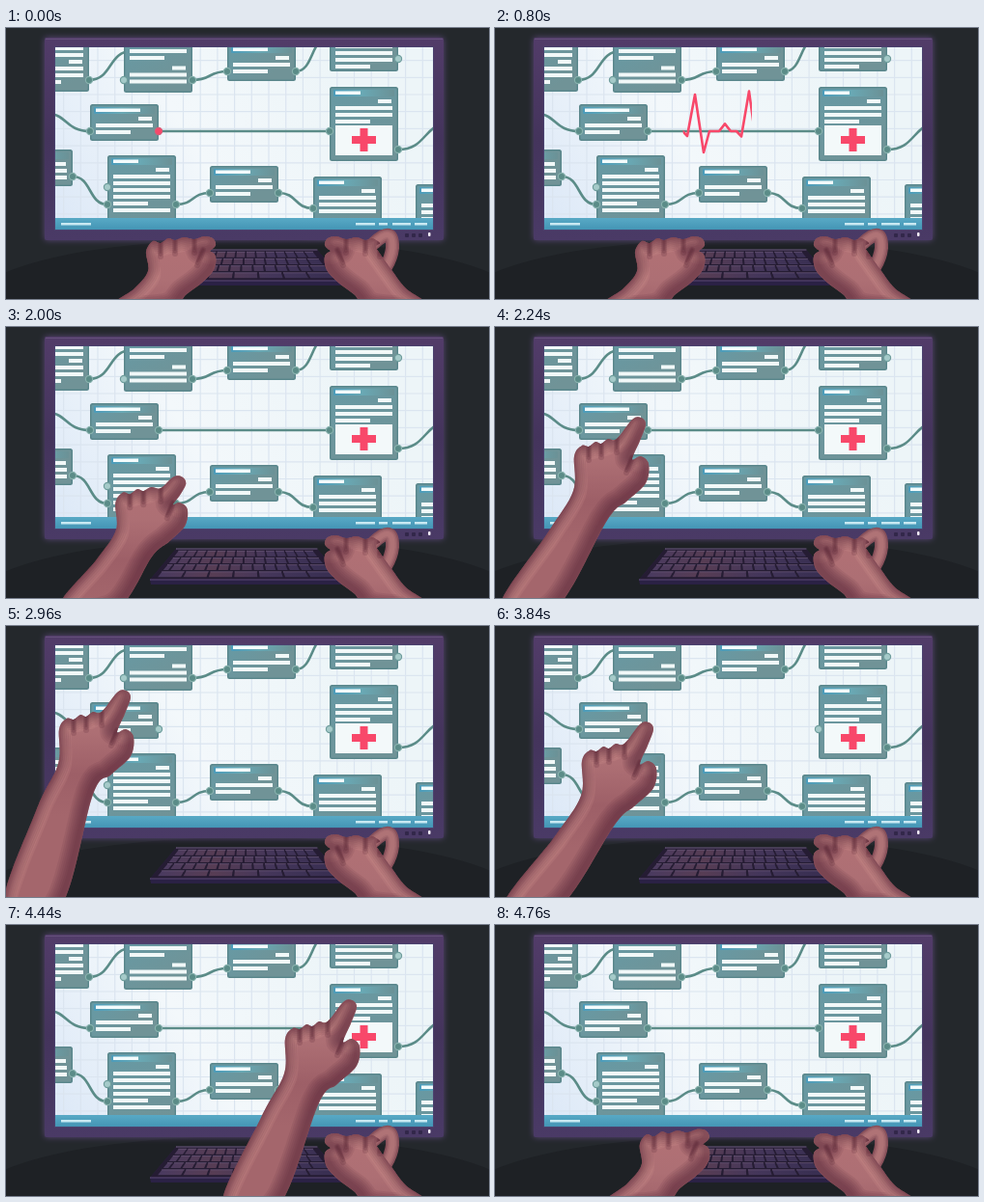
An HTML page with a canvas that plays this animation: 500 by 281 pixels, repeating every 4800 ms.

```html
<!DOCTYPE html>
<html lang="en">
<head>
<meta charset="utf-8">
<title>Wiring nodes by hand</title>
<style>
html, body { margin: 0; width: 100%; height: 100%; overflow: hidden; background: #24282c; }
canvas { display: block; width: 500px; height: 281px; }
</style>
</head>
<body>
<canvas></canvas>
<script>
const LOOP = 4800;
const canvas = document.querySelector('canvas');
const ctx = canvas.getContext('2d');
const ratio = window.devicePixelRatio || 1;
canvas.width = 500 * ratio;
canvas.height = 281 * ratio;

const PINK = '#f8486a', WIRE = '#5b8c88', FREE = '#a5cac9';
const lerp = (a, b, u) => a + (b - a) * u;
const clamp = u => Math.max(0, Math.min(1, u));
const smooth = u => u * u * (3 - 2 * u);

function box(x, y, w, h, fill, r = 0) {
  ctx.fillStyle = fill;
  ctx.beginPath();
  ctx.roundRect(x, y, w, h, r);
  ctx.fill();
}

function shade(x0, y0, x1, y1, ...colors) {
  const g = ctx.createLinearGradient(x0, y0, x1, y1);
  colors.forEach((c, i) => g.addColorStop(i / (colors.length - 1), c));
  return g;
}

function polygon(pts) {
  const path = new Path2D();
  pts.forEach(([x, y]) => path.lineTo(x, y));
  return path;
}

function area(pts, fill) {
  ctx.fillStyle = fill;
  ctx.fill(polygon(pts));
}

function stroke(path, width, color) {
  ctx.lineWidth = width;
  ctx.strokeStyle = color;
  ctx.stroke(path);
}

// Closed curve through all points
function blob(pts) {
  const path = new Path2D(), n = pts.length;
  path.moveTo(...pts[0]);
  pts.forEach((p, i) => {
    const before = pts[(i + n - 1) % n], q = pts[(i + 1) % n], after = pts[(i + 2) % n];
    path.bezierCurveTo(p[0] + (q[0] - before[0]) / 6, p[1] + (q[1] - before[1]) / 6,
      q[0] - (after[0] - p[0]) / 6, q[1] - (after[1] - p[1]) / 6, ...q);
  });
  return path;
}

// x, top, bottom, title width, rows: r short at the right, f full, s short, . gap
const nodes = [
  [15, 6, 66, 26, 'ffrffs'], [122, 9, 67, 26, 'fs.rff'], [229, 16, 55, 36, 'rfs'],
  [335, 4, 45, 26, 'fffs'], [87, 79, 117, 46, 'rfs'], [335, 61, 138, 26, 'rffs'],
  [-2, 126, 164, 46, 'rff'], [105, 132, 210, 26, 'rffffsf'], [211, 143, 181, 36, 'rfs'],
  [318, 154, 210, 26, 'rfff'], [424, 162, 210, 26, 'rfff']
];
const wires = [
  [86, 54, 130, 24], [193, 54, 229, 45], [300, 45, 334, 10], [38, 88, 87, 107],
  [406, 126, 462, 98], [69, 154, 105, 183], [176, 183, 211, 171], [282, 171, 318, 187]
];
const freePorts = [[122, 54], [406, 32], [105, 165]];

function drawNode([x, top, bottom, title, rows]) {
  const h = bottom - top;
  box(x, top, 71, h, '#5a878c', 2.5);
  box(x + 1.5, top + 1.5, 68, h - 3, shade(x, top, x + 40, bottom, '#669aa5', '#709397'), 1.5);
  box(x + 4, top + 3, 63, 7, shade(x, 0, x + 66, 0, '#489abb', '#69a9b5', '#6b9297'), 1);
  box(x + 6, top + 4.5, title, 3.5, '#f3fbfc');
  let y = top + 13;
  for (const row of rows) {
    if (row === 'r') box(x + 50, y, 14, 4, '#f1f8f8');
    if (row === 'f') box(x + 6, y, 59, 4, '#f1f8f8');
    if (row === 's') box(x + 6, y, 36, 4, '#f1f8f8');
    y += row === '.' ? 3.5 : 7;
  }
}

function drawWire([x0, y0, x1, y1]) {
  const path = new Path2D(), reach = (x1 - x0) * 0.55;
  path.moveTo(x0, y0);
  path.bezierCurveTo(x0 + reach, y0, x1 - reach, y1, x1, y1);
  stroke(path, 2.6, WIRE);
}

function drawPort(x, y, fill) {
  ctx.beginPath();
  ctx.arc(x, y, 3.6, 0, 7);
  ctx.fillStyle = fill;
  ctx.fill();
  ctx.lineWidth = 1.2;
  ctx.strokeStyle = { [PINK]: '#d95d77', [WIRE]: '#89b2ae' }[fill] || '#6f9d9c';
  ctx.stroke();
}

function drawMonitor(t, tipX) {
  ctx.shadowColor = '#5b4778';
  ctx.shadowBlur = 6 * ratio;
  box(40, 10, 413, 210, shade(0, 10, 0, 220, '#523c69', '#44345c', '#4a3a66'), 2);
  ctx.shadowBlur = 0;
  box(41, 11, 411, 1, '#64507a');
  box(50, 19, 393, 191, '#4c4370', 1);
  for (let x = 413; x < 432; x += 7) box(x, 213, 4, 4, '#32274a', 1);
  box(437, 212, 2.5, 4, '#f4eef9', 1);

  ctx.save();
  ctx.beginPath();
  ctx.rect(51, 20, 391, 189);
  ctx.clip();
  box(51, 20, 391, 189, shade(51, 200, 330, 30, '#dce8f7', '#f3f8fb', '#edf5f8'));
  for (let x = 59; x < 442; x += 17.7) box(x, 20, 1.2, 178, '#dbe5f0');
  for (let y = 33; y < 198; y += 17.7) box(51, y, 391, 1.2, '#dbe5f0');

  wires.forEach(drawWire);
  nodes.forEach(drawNode);
  box(341, 101, 59, 31, '#f3f9fa');
  box(358, 112, 25, 8, PINK);
  box(366.5, 104, 8, 24, PINK);

  drawLink(t, tipX);
  for (const [x0, y0, x1, y1] of wires) {
    drawPort(x0, y0, WIRE);
    if (y1 > 40) drawPort(x1, y1, WIRE);
  }
  freePorts.forEach(p => drawPort(...p, FREE));
  const linked = t < 2640 || t > 4390;
  drawPort(158, 107, t < 600 ? PINK : linked || t > 3930 ? WIRE : FREE);
  drawPort(335, 107, t > 1220 && t < 1680 ? PINK : linked ? WIRE : FREE);

  box(51, 197, 391, 12, shade(0, 197, 0, 209, '#58a9c5', '#4495b5'));
  for (const [x, w] of [[57, 31], [362, 20], [386, 9], [400, 19], [423, 13]])
    box(x, 202, w, 2.5, '#c9e9f2');
  ctx.restore();
}

const pulse = [[19, 0], [25, -7], [31, 0], [37, 0], [42, 5], [50, -38], [59, 22], [65, 0]];
const beat = (x, size) => pulse.map(([dx, dy]) => [x + dx, 107 + dy * size]);
const heartbeat = polygon([[157, 107], ...beat(157, 1), ...beat(213, 1.09), [335, 107]]);

// The wire that is unplugged and drawn anew, and the heartbeat that runs on it
function drawLink(t, tipX) {
  const end = t < 3930 || t > 4390 ? 335 : tipX;
  ctx.globalAlpha = t < 3930 ? 1 - clamp((t - 2580) / 120) : 1;
  stroke(polygon([[158, 107], [end, 107]]), 2.6, WIRE);
  ctx.globalAlpha = 1;
  const head = Math.min(335, 157 + (t - 120) * 0.16);
  const tail = Math.max(157, 164 + (t - 640) * 0.19);
  if (t < 120 || tail >= head) return;
  ctx.save();
  ctx.beginPath();
  ctx.rect(tail, 20, head - tail, 180);
  ctx.clip();
  stroke(heartbeat, 2.6, PINK);
  ctx.restore();
}

function drawKeyboard() {
  const at = (u, v) => [lerp(lerp(176, 149, v), lerp(322, 350, v), u), lerp(230, 262, v)];
  const [a, b, c, d] = [at(0, 0), at(1, 0), at(1, 1), at(0, 1)];
  area([a, b, c, [350, 267], [150, 267], d], '#2b2145');
  area([a, b, c, d], '#251c33');
  stroke(polygon([a, b]), 1, '#6d5a80');
  stroke(polygon([d, c]), 1, '#5c4a78');
  for (let row = 0; row < 4; row++) {
    const n = row < 3 ? 14 : 7, skew = row < 3 ? row * 0.2 : 0;
    const v0 = 0.07 + row * 0.225, v1 = v0 + 0.17;
    for (let i = 0; i < n; i++) {
      const u0 = 0.03 + 0.94 * Math.max(0, i - skew) / n;
      const u1 = 0.018 + 0.94 * (i === n - 1 ? n : i + 1 - skew) / n;
      const key = [at(u0, v0), at(u1, v0), at(u1, v1), at(u0, v1)];
      area(key, shade(160, 230, 330, 262, '#493a60', '#573d54', '#44365a', '#392f52'));
      stroke(polygon(key.slice(0, 2)), 0.6, '#7a6688');
    }
  }
}

// Outlines from the elbow over pinky, ring, middle, index and thumb back to the elbow
const pointing = [
  [96, 292], [150, 218], [177, 176], [178, 140], [186, 129], [193, 130], [200, 125],
  [206, 127], [213, 122], [222, 122], [238, 102], [247, 100], [252, 107], [246, 124],
  [238, 143], [247, 140], [255, 148], [252, 168], [232, 187], [212, 206], [154, 292]
];
const typing = [
  [106, 292], [133, 270], [147, 252], [145, 232], [152, 221], [160, 223], [168, 218],
  [175, 220], [184, 217], [195, 219], [205, 216], [214, 218], [217, 225], [211, 231],
  [204, 232], [210, 231], [217, 237], [215, 251], [203, 264], [187, 276], [168, 292]
];
// The right hand mirrors the left, with a slimmer palm beside the raised pinky
const resting = typing.map(([x, y], i) => i === 3 || i === 4 ? [x + 12, y + 6] : [x, y]);

function drawHand(pts) {
  const path = blob(pts), top = pts[11][1];
  ctx.save();
  ctx.fillStyle = shade(0, top, 0, top + 130, '#b27175', '#ad6f74', '#9d5f67', '#a4666c');
  ctx.fill(path);
  ctx.clip(path);
  ctx.translate(5, 5);
  for (let w = 16; w > 3; w -= 4) stroke(path, w, 'rgba(222,160,158,.13)');
  ctx.translate(-8, -7);
  for (let w = 30; w > 2; w -= 4) stroke(path, w, 'rgba(76,30,52,.1)');
  ctx.translate(3, 2);
  for (const i of [5, 7, 9, 14]) {
    const [x, y] = pts[i], dx = i === 14 ? -6 : 0;
    for (let w = 6; w > 1; w -= 2)
      stroke(polygon([[x, y - 2], [x + dx, y + 8 + w]]), w, 'rgba(84,36,52,.2)');
  }
  ctx.restore();
}

function drawRightHand() {
  ctx.save();
  ctx.translate(547, 0);
  ctx.scale(-1, 1);
  const pinky = new Path2D('M166 223Q146 204 147 228Q148 238 154 248');
  for (let w = 14; w > 2; w -= 3)
    stroke(pinky, w, w > 12 ? '#87505a' : 'rgba(196,132,134,.3)');
  drawHand(resting);
  ctx.restore();
}

// start, end, pointing amount, fingertip x, y
const moves = [
  [1800, 2200, 1, 148, 102], [2560, 2960, 1, 121, 75], [3560, 3820, 1, 156, 108],
  [3930, 4390, 1, 334, 108], [4390, 4440, 1, 355, 86], [4440, 4800, 0, 355, 86]
];

function handAt(t) {
  const [point, x, y] = moves.reduce((state, [start, end, ...goal]) => {
    const u = smooth(clamp((t - start) / (end - start)));
    return state.map((v, i) => lerp(v, goal[i], u));
  }, [0, 148, 102]);
  const pts = typing.map(([hx, hy], i) => {
    const [px, py] = pointing[i];
    // the arm stretches between the moving wrist and the fixed elbow height
    const hold = clamp((292 - py) / 90);
    const dx = x - 244 + (1 - hold) * (108 - y) * 0.75, dy = (y - 108) * hold;
    return [lerp(hx, px + dx, point), lerp(hy, py + dy, point)];
  });
  return { x, pts };
}

function draw(t) {
  const hand = handAt(t);
  ctx.setTransform(ratio, 0, 0, ratio, 0, 0);
  ctx.lineCap = ctx.lineJoin = 'round';
  box(0, 0, 500, 281, '#24282c');
  ctx.beginPath();
  ctx.ellipse(250, 285, 285, 66, 0, 0, 7);
  ctx.fillStyle = '#1e2125';
  ctx.fill();
  drawMonitor(t, hand.x);
  drawKeyboard();
  drawRightHand();
  drawHand(hand.pts);
}

function tick(now) {
  draw(now % LOOP);
  requestAnimationFrame(tick);
}
requestAnimationFrame(tick);
</script>
</body>
</html>
```
